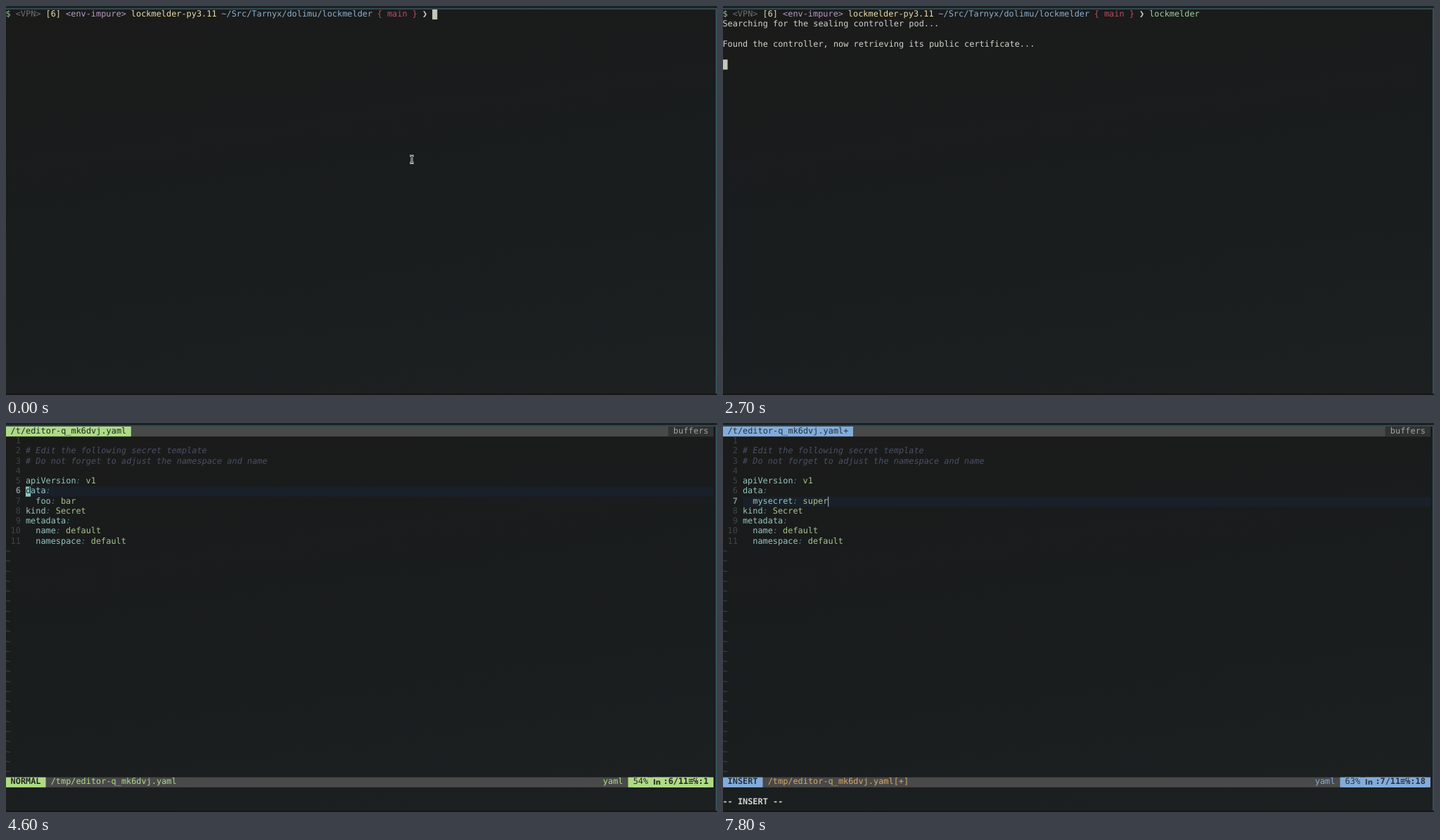
These frames come from a looping animation (1011 px wide and 554 px high, 8 s). An HTML page:

```html
<!DOCTYPE html>
<html lang="en">
<head>
<meta charset="utf-8">
<title>Terminal session</title>
<style>
html, body { margin: 0; width: 100%; height: 100%; overflow: hidden; background: #1a1d1e; }
#stage {
  position: relative; width: 1011px; height: 554px; overflow: hidden;
  background: linear-gradient(172deg, #1a1b19 0%, #1a1b1b 18%, #191c1d 40%, #1a1e1f 70%, #1c2020 100%);
}
/* a grid of 8 by 16 cells, scaled down to the stage */
#screen {
  position: absolute; left: 0; top: 0; transform-origin: 0 0;
  transform: translate(-.6px, 4.9px) scale(.8923);
  font: 13.33px/16px "DejaVu Sans Mono", monospace;
  text-rendering: geometricPrecision; font-variant-ligatures: none;
}
.frame { position: absolute; }
.top { left: 0; top: 0; width: 1011px; height: 3px; background: #1a2224; border-bottom: 2px solid #324a51; }
.right { left: 1009px; top: 4px; width: 1.5px; height: 548px; background: #34505a; }
.bottom { left: 0; top: 552px; width: 1011px; height: 2px; background: #191416; }
#mouse { position: absolute; left: 571px; top: 211px; }
#screen i { position: absolute; height: 16px; white-space: pre; font-style: normal; }
#screen .b { font-weight: bold; }
#screen .it { font-style: italic; }
#screen .ln { font: bold 11.5px/17px "DejaVu Sans", sans-serif; }
.dollar { color: #94c792; } .dim { color: #6b6f6e; } .jobs { color: #e3d8ae; }
.env { color: #b998ca; } .venv { color: #ebdca6; } .path { color: #8cb0d3; }
.red { color: #b84f5e; } .fg { color: #d2d4cc; } .ok { color: #9fcf99; }
.block { background: #c5c8b9; }
.num { color: #3e4448; } .numOn { color: #7d8b94; } .tilde { color: #3b474b; }
.comment { color: #4a5066; } .key { color: #93c5c0; } .colon { color: #4d7c7c; } .val { color: #a5c48b; }
.row { background: #1a2029; }
.cur { background: #8ec8c2; color: #1a1d1e; }
.bar { background: #c3cbd0; }
.grey { background: #494949; } .buffers { background: #323232; color: #a3a3a3; }
.green { background: #aedb85; color: #232723; } .blue { background: #83acdb; color: #25323f; }
.greenText { color: #aedb85; } .blueText { color: #83acdb; } .orange { color: #d6a862; }
</style>
</head>
<body>
<div id="stage">
  <div id="screen"></div>
  <svg id="mouse" width="12" height="16" fill="none">
    <g id="beams">
      <path d="M3 2.4H4.6L6 3.4L7.4 2.4H9M6 3.4V11.6M3 12.6H4.6L6 11.6L7.4 12.6H9" stroke="#e8eaea" stroke-width="2.8"/>
      <path d="M3 2.4H4.6L6 3.4L7.4 2.4H9M6 3.4V11.6M3 12.6H4.6L6 11.6L7.4 12.6H9" stroke="#0c0e0e" stroke-width="1"/>
    </g>
  </svg>
  <div class="frame top"></div><div class="frame right"></div><div class="frame bottom"></div>
</div>
<script>
const LOOP = 8000, CELL = 8, LINE = 16, COLS = 141;
const screenEl = document.getElementById('screen');
const mouse = document.getElementById('mouse');
const command = 'lockmelder';
const file = 'editor-q_mk6dvj.yaml';

const prompt = [
  ['$', 'dollar'], ['<VPN>', 'dim'], ['[6]', 'jobs'], ['<env-impure>', 'env'],
  [command + '-py3.11', 'venv'], ['~/Src/Tarnyx/dolimu/' + command, 'path'],
  ['{ main }', 'red'], ['❯', 'fg'],
];

// time, characters typed
const typing = [[0, 0], [100, 1], [300, 2], [400, 4], [600, 5], [800, 6], [900, 8], [1100, 9], [1200, 10]];

// time, row, text, row of the cursor afterwards
const logs = [
  [2400, 1, 'Searching for the sealing controller pod...', 3],
  [2700, 3, 'Found the controller, now retrieving its public certificate...', 5],
  [3000, 5, 'Certificate stored, opening the secret template in your editor: save and close the file to seal it, or quit to abort...', 8],
];

// time, mode, line, column, key, value, pending command
const N = 'NORMAL', I = 'INSERT', K = 'mysecret';
const edits = [
  [3500, N, 1, 1, 'foo', 'bar'], [3900, N, 2, 1, 'foo', 'bar'], [4000, N, 3, 1, 'foo', 'bar'],
  [4100, N, 4, 1, 'foo', 'bar'], [4300, N, 5, 1, 'foo', 'bar'], [4600, N, 6, 1, 'foo', 'bar'],
  [4700, N, 7, 1, 'foo', 'bar'], [4800, N, 7, 3, 'foo', 'bar'], [4900, N, 7, 3, 'foo', 'bar', 'c'],
  [5100, I, 7, 3, '', 'bar'], [5300, I, 7, 4, 'm', 'bar'], [5500, I, 7, 5, 'my', 'bar'],
  [5700, I, 7, 6, 'mys', 'bar'], [5900, I, 7, 7, 'myse', 'bar'], [6100, I, 7, 8, 'mysec', 'bar'],
  [6300, I, 7, 9, 'mysecr', 'bar'], [6400, I, 7, 10, 'mysecre', 'bar'], [6500, I, 7, 11, K, 'bar'],
  [6700, N, 7, 10, K, 'bar'], [6800, N, 7, 11, K, 'bar'], [6900, N, 7, 13, K, 'bar'],
  [7100, N, 7, 13, K, 'bar', 'c'], [7300, I, 7, 13, K, ''], [7500, I, 7, 14, K, 's'],
  [7600, I, 7, 16, K, 'sup'], [7800, I, 7, 18, K, 'super'],
];

const latest = (list, t) => list.filter(step => step[0] <= t).pop();
const escapeText = s => s.replace(/&/g, '&amp;').replace(/</g, '&lt;');

let html = '';
function put(row, col, text, cls, width = text.length * CELL) {
  // each word starts on its own cell, so the grid holds across long lines
  const pos = `left:${col * CELL}px;top:${row * LINE}px;width:${width}px`;
  html += `<i class="${cls}" style="${pos}">${escapeText(text)}</i>`;
}
const fill = (row, from, to, cls) => put(row, from, '', cls, (to - from) * CELL);

function drawShell(t) {
  let col = 0;
  for (const [text, cls] of prompt) {
    put(0, col, text, cls);
    col += text.length + 1;
  }
  const typed = latest(typing, t)[1];
  put(0, col, command.slice(0, typed), typed < command.length ? 'red' : 'ok');
  if (t < 2100) return put(0, col + typed, ' ', 'block');
  let cursorRow = 1;
  for (const [time, row, text, next] of logs) {
    if (t < time) break;
    put(row, 0, text, 'fg');
    cursorRow = next;
  }
  put(cursorRow, 0, ' ', 'block');
}

function drawLine(n, text) {
  if (text[0] === '#') return put(n, 4, text, 'comment it');
  const parts = text.match(/^(\s*)(\w*)(:) ?(.*)$/);
  if (!parts) return;
  const [, indent, key, colon, value] = parts;
  const start = 4 + indent.length;
  put(n, start, key, 'key');
  put(n, start + key.length, colon, 'colon it');
  put(n, start + key.length + 2, value, 'val');
}

function drawStatus(mode, line, column, modified) {
  const tone = mode === N ? 'green' : 'blue';
  const percent = Math.floor(line / 11 * 100) + '%';
  const position = `:${line}/11≡℅:${column}`;
  const start = COLS - percent.length - position.length - 5;
  fill(35, 0, COLS, 'grey');
  put(35, 0, ` ${mode} `, tone + ' b');
  put(35, 9, `/tmp/${file}${modified ? '[+]' : ''}`, modified ? 'orange' : 'greenText');
  put(35, start - 5, 'yaml', tone + 'Text');
  fill(35, start, COLS, tone);
  const ink = tone + ' b';
  put(35, start + 1, percent, tone);
  put(35, start + percent.length + 2, 'ln', ink + ' ln');
  [...position].forEach((ch, i) => put(35, COLS - 1 - position.length + i, ch, ink));
}

function drawEditor(t) {
  const [, mode, line, column, key, value, pending] = latest(edits, t);
  const modified = t >= 5100;
  const lines = [
    '', '# Edit the following secret template',
    '# Do not forget to adjust the namespace and name', '',
    'apiVersion: v1', 'data:', `  ${key}: ${value}`, 'kind: Secret',
    'metadata:', '  name: default', '  namespace: default',
  ];
  fill(0, 0, COLS, 'grey');
  put(0, 0, ` /t/${file}${modified ? '+' : ''} `, modified ? 'blue' : 'green');
  put(0, COLS - 9, ' buffers ', 'buffers');
  fill(line, 4, COLS, 'row');
  lines.forEach((text, i) => {
    const n = i + 1;
    put(n, n < 10 ? 2 : 1, String(n), n === line ? 'numOn b' : 'num');
    drawLine(n, text);
  });
  for (let row = 12; row < 35; row++) put(row, 0, '~', 'tilde');
  if (mode === N) put(line, 3 + column, lines[line - 1][column - 1] || ' ', 'cur');
  else put(line, 3 + column, '', 'bar', 1.3);
  drawStatus(mode, line, column, modified);
  if (mode === I) put(37, 0, '-- INSERT --', 'fg b');
  if (pending) put(37, COLS - 11, pending, 'fg');
}

let shown = '';
function tick(now) {
  const t = now % LOOP;
  html = '';
  if (t < 3300) drawShell(t);
  else if (t >= 3500) drawEditor(t);
  if (html !== shown) screenEl.innerHTML = shown = html;
  mouse.style.display = t < 100 ? 'block' : 'none';
  requestAnimationFrame(tick);
}
tick(0);
</script>
</body>
</html>
```
